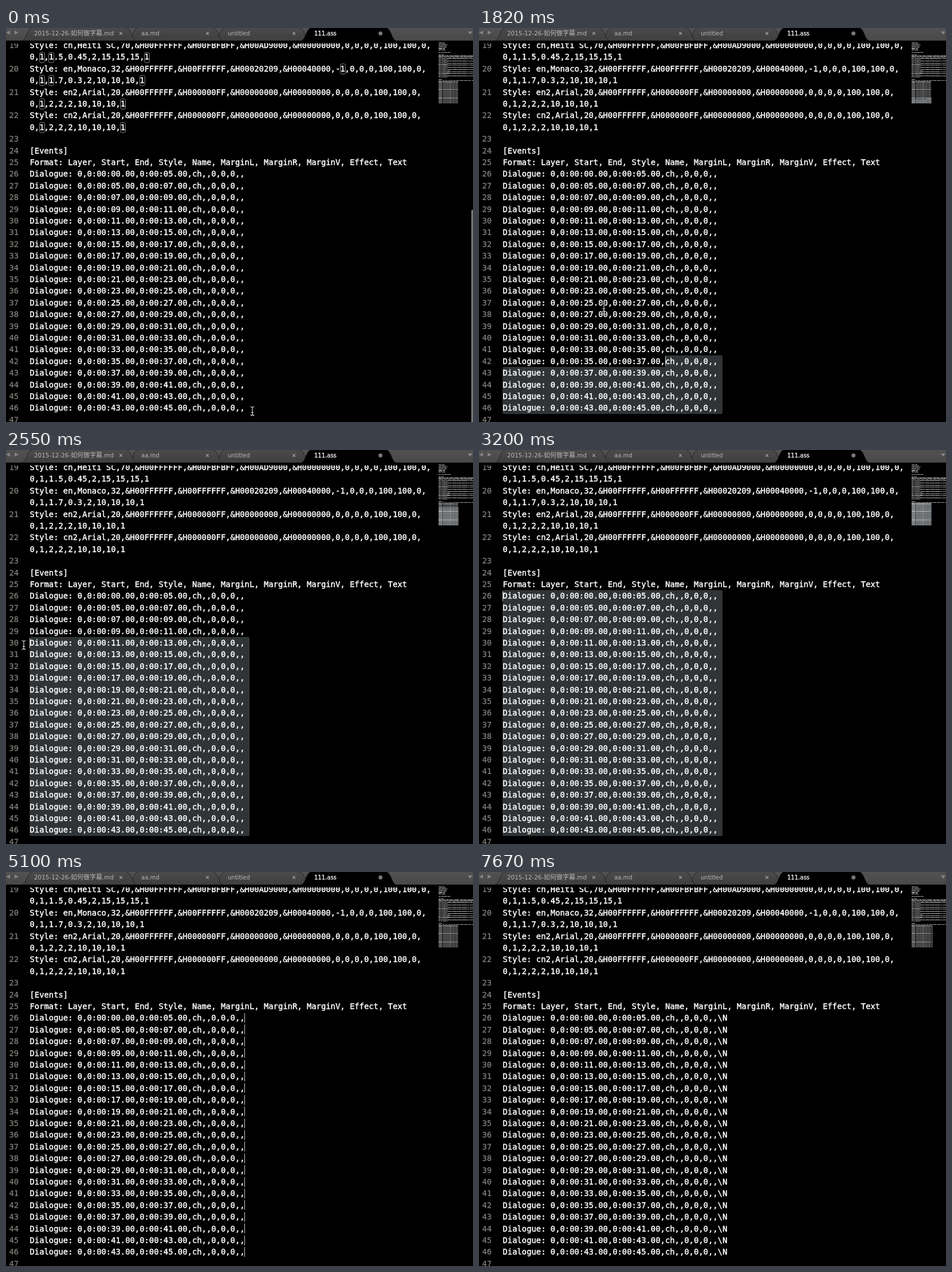
These frames come from a looping animation (815 by 687 pixels, 8 s). An HTML page:

```html
<!DOCTYPE html>
<html lang="en">
<head>
<meta charset="utf-8">
<title>Subtitle editing</title>
<style>
html, body { margin: 0; width: 100%; height: 100%; overflow: hidden; background: #000; }
svg { display: block; width: 815px; height: 687px; }
text { white-space: pre; }
.code, .num { font: 13.855px "DejaVu Sans Mono", Menlo, monospace; }
.code { fill: #fff; stroke: #fff; stroke-width: .45px; }
.num { fill: #85867f; stroke: #85867f; stroke-width: .2px; }
#mini .code { stroke-width: 1.7px; }
.tab { font: 10px "DejaVu Sans", "Noto Sans CJK SC", "Noto Sans CJK", sans-serif; fill: #b8b8b8; }
</style>
</head>
<body>
<svg viewBox="0 0 815 687">
  <defs>
    <linearGradient id="bar" x2="0" y2="1"><stop stop-color="#525252"/><stop offset="1" stop-color="#484848"/></linearGradient>
    <linearGradient id="idle" x2="0" y2="1"><stop stop-color="#4b4b4b"/><stop offset="1" stop-color="#3e3e3e"/></linearGradient>
    <path id="beam" d="M-3 -7.5Q0 -7.5 0 -5.5Q0 -7.5 3 -7.5M0 -5.5V5.5M-3 7.5Q0 7.5 0 5.5Q0 7.5 3 7.5M-1.5 2.5H1.5"/>
  </defs>
  <rect width="815" height="687"/>
  <g id="selection" fill="#303436"></g>
  <g id="dots" fill="#555a5c"></g>
  <g id="rows"></g>
  <g id="boxes" fill="none" stroke="#858585"></g>
  <g id="carets" fill="#ccc"></g>
  <g id="tabs"><rect width="815" height="26.5"/><rect width="815" height="22" fill="url(#bar)"/></g>
  <g id="miniSel" fill="#43494c"></g>
  <g id="mini"></g>
  <rect id="scroll" x="812" y="317" width="5" height="372" rx="2" fill="#777"/>
  <g id="pointer" fill="none" stroke-linecap="round">
    <use href="#beam" stroke="#000" stroke-width="2.6"/>
    <use href="#beam" stroke="#eee" stroke-width="1.1"/>
  </g>
</svg>
<script>
const LOOP = 8000, LEFT = 41.5, ADV = 8.341, PITCH = 20.4, FIRST = 11, LAST = 31, COLS = 45;
const MINI_X = 755, MINI_PITCH = 1.87, MINI_ADV = 0.78;
const PRESS = 1470, DRAG = 1640, RELEASE = 3200, SPLIT = 4230, DESELECT = 5100, TYPE_1 = 6600, TYPE_2 = 7290;

const $ = id => document.getElementById(id);
const colX = c => LEFT + c * ADV;
const rowY = r => 30.1 + r * PITCH;
const miniY = r => 92 + (r - FIRST) * MINI_PITCH;
const set = (node, attrs) => { for (const key in attrs) node.setAttribute(key, attrs[key]); };
const show = (node, on) => node.setAttribute("visibility", on ? "visible" : "hidden");

function add(parent, tag, attrs, content) {
  const node = document.createElementNS("http://www.w3.org/2000/svg", tag);
  set(node, attrs);
  if (content !== undefined) node.textContent = content;
  return $(parent).appendChild(node);
}

// Document
const arial = "Arial,20,&H00FFFFFF,&H000000FF,&H00000000,&H00000000,0,0,0,0,100,100,0,";
const arialEnd = "0,1,2,2,2,10,10,10,1";
const lines = [
  "Style: ch,Heiti SC,70,&H00FFFFFF,&H00FBFBFF,&H00AD9000,&H00000000,0,0,0,0,100,100,0,",
  "0,1,1.5,0.45,2,15,15,15,1",
  "Style: en,Monaco,32,&H00FFFFFF,&H00FFFFFF,&H00020209,&H00040000,-1,0,0,0,100,100,0,",
  "0,1,1.7,0.3,2,10,10,10,1",
  "Style: en2," + arial, arialEnd,
  "Style: cn2," + arial, arialEnd,
  "", "[Events]",
  "Format: Layer, Start, End, Style, Name, MarginL, MarginR, MarginV, Effect, Text"
];
const stamp = s => "0:00:" + String(s).padStart(2, "0") + ".00";
for (let k = 0; k <= LAST - FIRST; k++)
  lines.push(`Dialogue: 0,${stamp(k ? 2 * k + 3 : 0)},${stamp(2 * k + 5)},ch,,0,0,0,,`);

// Scrolled-off part, seen only in the minimap
const header = [
  "[Script Info]", "; Edited by hand", "Title: Untitled file", "ScriptType: v4.00+",
  "Collisions: Normal", "PlayResX: 1280", "PlayResY: 720", "Timer: 100.0000", "",
  "Last Style Storage: Default", "", "[V4+ Styles]",
  "Format: Name, Fontname, Fontsize, PrimaryColour, SecondaryColour, OutlineColour,",
  "BackColour, Bold, Italic, Underline, StrikeOut, ScaleX, ScaleY, Spacing, Angle,",
  "BorderStyle, Outline, Shadow, Alignment, MarginL, MarginR, MarginV, Encoding"
];
for (let k = 0; k < 5; k++) header.push("Style: st" + k + "," + arial, arialEnd);

const codeRow = (text, r) => add("rows", "text", { class: "code", x: LEFT, y: rowY(r) + 4.9 }, text);
const miniRow = (text, r) => add("mini", "text", {
  class: "code", transform: `translate(${MINI_X} ${miniY(r) + 1.5}) scale(.0936 .0917)`
}, text);
const codeRows = lines.map(codeRow);
const miniRows = lines.map(miniRow);
header.forEach((text, i) => miniRow(text, i - header.length));

// Lines 19 to 22 wrap onto two rows
for (let n = 19; n <= 47; n++) {
  const r = n < 23 ? (n - 19) * 2 : n - 15;
  add("rows", "text", { class: "num", x: 5.4, y: rowY(r) + 4.9 }, n);
}

// Outlined matches of the number 1
lines.slice(0, 8).forEach((text, r) => {
  for (const m of text.matchAll(/\b1\b/g))
    add("boxes", "rect", { x: Math.floor(colX(m.index)) + .5, y: Math.round(rowY(r)) - 8.5, width: 9, height: 18, rx: 3 });
});

// Tab bar
function tabShape(x1, x2, active) {
  add("tabs", "path", {
    d: `M${x1} 22.5C${x1 + 9} 20 ${x1 + 8} 0 ${x1 + 19} -.5H${x2 - 19}C${x2 - 8} 0 ${x2 - 9} 20 ${x2} 22.5Z`,
    fill: active ? "#000" : "url(#idle)", stroke: active ? "#111" : "#222"
  });
}
const label = (x, text, style = "") => add("tabs", "text", { class: "tab", x, y: 13, style }, text);
for (const i of [2, 1, 0, 3]) tabShape(i ? 62 + 151 * i : 28, 228 + 151 * i, i === 3);
for (let i = 0; i < 3; i++)
  add("tabs", "path", { d: `M${198.2 + 151 * i} 7.2l4.6 4.6m0 -4.6l-4.6 4.6`, stroke: "#aaa", "stroke-width": 1.2 });
add("tabs", "rect", { y: 22, width: 815, height: 4.5 });
add("tabs", "path", { d: "M7 4.5V11.5L0 8ZM15 4.5V11.5L22 8ZM806 6H814L810 11.5Z", fill: "#858585" });
label(49, "2015-12-26-", "font-size:10.4px");
label(113, "如何做字幕", "font-size:11px");
label(168, ".md", "font-size:10.4px");
label(236, "aa.md");
label(387, "untitled");
label(538, "111.ass", "fill:#fff;stroke:#fff;stroke-width:.3px");
add("tabs", "circle", { cx: 653.5, cy: 9.5, r: 3.5, fill: "#777" });

// Parts for the selection and the dialogue rows
const body = [0, 1].map(() => add("selection", "rect", { rx: 3 }));
const dialogue = lines.slice(FIRST).map((text, i) => {
  const r = FIRST + i, y = rowY(r);
  return {
    r, text,
    band: add("selection", "rect", { x: 41, y: y - 10.2, width: 376, height: PITCH, rx: 2.5 }),
    dot: add("dots", "circle", { cx: colX(9.5), cy: y + .5, r: .8 }),
    caret: add("carets", "rect", { y: Math.round(y - 8.5), width: 1, height: 17 }),
    mini: add("miniSel", "rect", { height: MINI_PITCH + .05 })
  };
});

// Drag path; the caret trails the pointer and both move in coarse steps
const path = [
  { t: DRAG, x: 430, y: 668, row: LAST, col: COLS },
  { t: 1790, x: 218, y: 487, row: 27, col: 34 },
  { t: 2090, x: 120, y: 365, row: 17, col: 10 },
  { t: 2390, x: 36, y: 361, row: 16, col: 0 },
  { t: 3140, x: 11, y: 256, row: FIRST, col: 0 }
];
function dragAt(time) {
  const t = Math.min(3140, DRAG + Math.max(0, Math.floor((time - DRAG) / 150)) * 150);
  const i = Math.max(1, path.findIndex(p => p.t >= t));
  const a = path[i - 1], b = path[i], f = (t - a.t) / (b.t - a.t);
  const mix = key => Math.round(a[key] + (b[key] - a[key]) * f);
  return { x: mix("x"), y: mix("y"), row: mix("row"), col: mix("col") };
}

// Each action restarts the caret blink
function caretOn(t) {
  if (t < RELEASE) return t >= PRESS;
  const last = [RELEASE, SPLIT, DESELECT, TYPE_1, TYPE_2].filter(a => a <= t).pop();
  const phase = (t - last) % 1100;
  return phase < 380;
}

function render(t) {
  const { x: px, y: py, row, col } = dragAt(t);
  const single = t < SPLIT;
  const dragged = t >= DRAG && single;
  const split = t >= SPLIT && t < DESELECT;
  const typed = t < TYPE_1 ? "" : t < TYPE_2 ? "\\" : "\\N";

  show($("boxes"), t < PRESS);
  show($("scroll"), t < 300);
  show($("pointer"), t < RELEASE);
  set($("pointer"), { transform: `translate(${px} ${py})` });

  const bottom = rowY(LAST) + 10.4;
  [[row, colX(col) - .5], [row + 1, 41]].forEach(([r, x], i) => {
    const y = rowY(r) - 10.2;
    show(body[i], dragged && r <= LAST);
    set(body[i], { x, y, width: 425 - x, height: Math.max(0, bottom - y) });
  });

  const lit = caretOn(t);
  for (const d of dialogue) {
    const start = single && d.r === row ? col : 0;
    const chosen = split || dragged && d.r >= row;
    const text = d.text + typed;
    show(d.band, split);
    show(d.dot, chosen && start <= 9);
    show(d.mini, chosen);
    set(d.mini, { x: MINI_X + start * MINI_ADV, y: miniY(d.r), width: (COLS - start) * MINI_ADV });
    show(d.caret, lit && (!single || d.r === row));
    set(d.caret, { x: Math.floor(colX(single ? col : text.length)) });
    if (codeRows[d.r].textContent !== text)
      codeRows[d.r].textContent = miniRows[d.r].textContent = text;
  }
}

const begin = performance.now();
function tick() {
  render((performance.now() - begin) % LOOP);
  requestAnimationFrame(tick);
}
tick();
</script>
</body>
</html>
```
